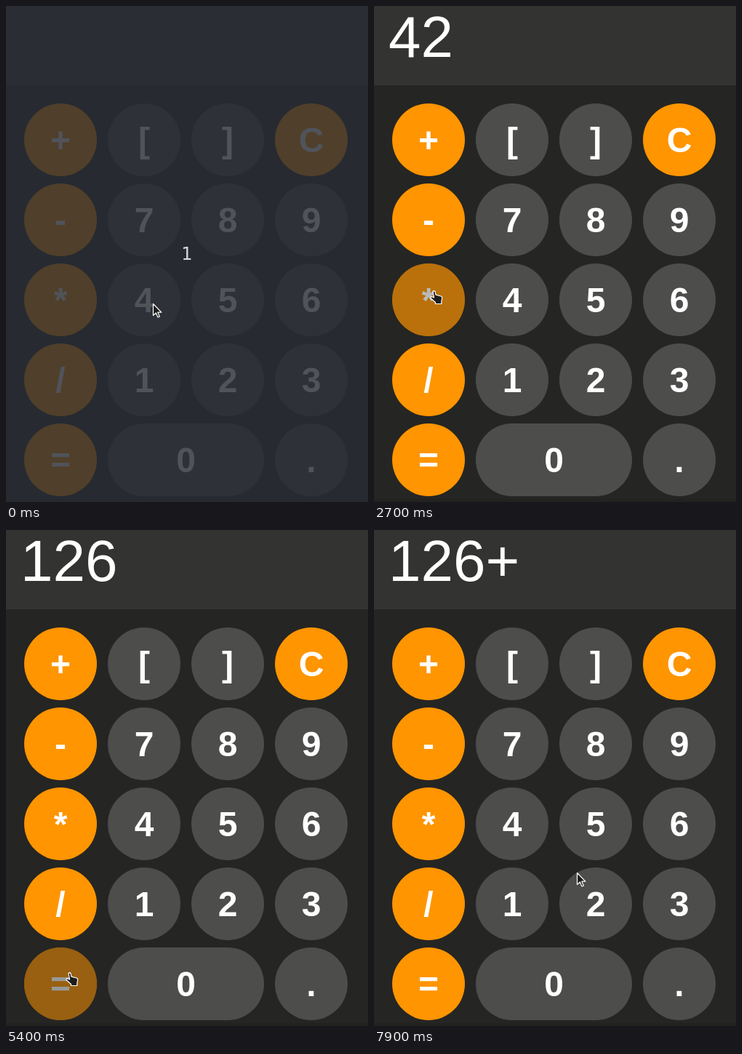
Write an HTML page with a canvas that moves like this. It is 498 px wide and 682 px high and loops after 8 s.

```html
<!DOCTYPE html>
<html lang="en">
<head>
<meta charset="utf-8">
<title>Calculator</title>
<style>
  html, body { margin: 0; width: 100%; height: 100%; overflow: hidden; background: #252523; }
  canvas { display: block; }
</style>
</head>
<body>
<canvas id="stage" width="498" height="682"></canvas>
<script>
const ctx = document.getElementById('stage').getContext('2d');
const LOOP = 8000, TICK = 100, STEP = 20;
const BG = '#252523', PANEL = '#333331', GREY = '#4d4d4b', ORANGE = '#ff9500';
const R = 50, HOVER = 0.65, ACTIVE = 0.35, FADE = 70;
const SANS = '"Liberation Sans", Arial, sans-serif';

const keys = [];
['+[]C', '-789', '*456', '/123', '=00.'].forEach((row, j) => {
  [...row].forEach((label, i) => {
    if (label === '0' && i === 2) return;
    const wide = label === '0' ? 115 : 0;
    keys.push({
      label, x: 75 + 115 * i, y: 184 + 110 * j, wide,
      color: i === 0 || label === 'C' ? ORANGE : GREY
    });
  });
});

// Pointer stops: time, x, y
const path = [
  [0, 202, 409], [1250, 202, 409], [1620, 279, 499], [2150, 279, 499],
  [2450, 122, 343], [2650, 83, 391], [3150, 83, 391], [3740, 418, 507],
  [4350, 418, 507], [4800, 215, 618], [5050, 88, 608], [5750, 88, 608],
  [6340, 104, 239], [6500, 102, 210], [7150, 102, 210], [7750, 279, 471]
];

// Mouse button held: from, to
const presses = [[620, 780], [1660, 1880], [2800, 3080], [4020, 4220], [5130, 5350], [6640, 7080]];

// Display content from the given time on
const shown = [[0, ''], [800, '4'], [1890, '42'], [3100, '42*'], [4230, '42*3'], [5350, '126'], [7100, '126+']];

function pointer(t) {
  const n = path.findIndex(p => p[0] > t);
  if (n < 0) return path[path.length - 1].slice(1);
  const [t0, x0, y0] = path[n - 1], [t1, x1, y1] = path[n];
  const u = (t - t0) / (t1 - t0), e = u * u * (3 - 2 * u);
  return [x0 + (x1 - x0) * e, y0 + (y1 - y0) * e];
}

function keyAt(x, y) {
  return keys.find(k => {
    const nearX = Math.max(k.x, Math.min(k.x + k.wide, x));
    return Math.hypot(x - nearX, y - k.y) <= R;
  });
}

// Replays hover and press fades from the start of the loop up to t
function opacities(t) {
  const op = new Map(keys.map(k => [k, 1]));
  const gain = 1 - Math.exp(-STEP / FADE);
  for (let s = 200; s <= t; s += STEP) {
    const over = keyAt(...pointer(s));
    const held = presses.some(([a, b]) => s >= a && s < b);
    for (const k of keys) {
      const goal = k !== over ? 1 : held ? ACTIVE : HOVER;
      op.set(k, op.get(k) + (goal - op.get(k)) * gain);
    }
  }
  return op;
}

function text(str, x, y, font, color, align) {
  ctx.font = font;
  ctx.fillStyle = color;
  ctx.textAlign = align;
  ctx.fillText(str, x, y);
}

function pill(k, color) {
  ctx.fillStyle = color;
  ctx.beginPath();
  ctx.arc(k.x, k.y, R, Math.PI / 2, Math.PI * 1.5);
  ctx.arc(k.x + k.wide, k.y, R, -Math.PI / 2, Math.PI / 2);
  ctx.fill();
}

function drawKey(k, op) {
  pill(k, k.color);
  text(k.label, k.x + k.wide / 2, k.y + 17, 'bold 48px ' + SANS, '#fff', 'center');
  if (op < 0.998) {
    ctx.globalAlpha = 1 - op;
    pill(k, BG);
    ctx.globalAlpha = 1;
  }
}

const arrow = new Path2D('M.5 .5V16.5L4.3 13L7 19L9.4 18L6.8 12.2H11.8Z');
const hand = new Path2D(
  'M-2 1.5Q-.5 0 1 1.5L2 6.2L9 8Q11 8.6 10.6 11L9.8 15V18.5H1.5V16.5' +
  'L-5 10.8Q-5.6 8.6-3.6 8.6L-.4 10Z');

function drawPointer(x, y, shape) {
  ctx.save();
  ctx.translate(Math.round(x), Math.round(y));
  ctx.fillStyle = '#1c1c1c';
  ctx.strokeStyle = '#fff';
  ctx.lineWidth = 1.2;
  ctx.lineJoin = 'round';
  ctx.fill(shape);
  ctx.stroke(shape);
  ctx.restore();
}

function drawOverlay(t) {
  const left = t < 200 ? 1 : Math.max(0, 1 - (t - 100) / 400);
  if (!left) return;
  ctx.globalAlpha = 0.81 * left;
  ctx.fillStyle = '#282c34';
  ctx.fillRect(0, 0, 498, 682);
  ctx.globalAlpha = left;
  text('1', 249, 349, '24px "DejaVu Sans", sans-serif', '#d7dae0', 'center');
  ctx.globalAlpha = 1;
}

function draw(t) {
  ctx.fillStyle = BG;
  ctx.fillRect(0, 0, 498, 682);
  ctx.fillStyle = PANEL;
  ctx.fillRect(0, 0, 498, 109);
  ctx.fillStyle = '#222220';
  ctx.fillRect(0, 678, 498, 4);

  const value = shown.filter(s => s[0] <= t).pop()[1];
  text(value, 20, 70, '80px ' + SANS, '#fff', 'left');

  const op = opacities(t);
  keys.forEach(k => drawKey(k, op.get(k)));
  drawOverlay(t);

  const [x, y] = pointer(t);
  drawPointer(x, y, t >= 200 && keyAt(x, y) ? hand : arrow);
}

let last = -1;
const start = performance.now();
function frame() {
  const t = Math.floor((performance.now() - start) % LOOP / TICK) * TICK;
  if (t !== last) draw(last = t);
  requestAnimationFrame(frame);
}
frame();
</script>
</body>
</html>
```
